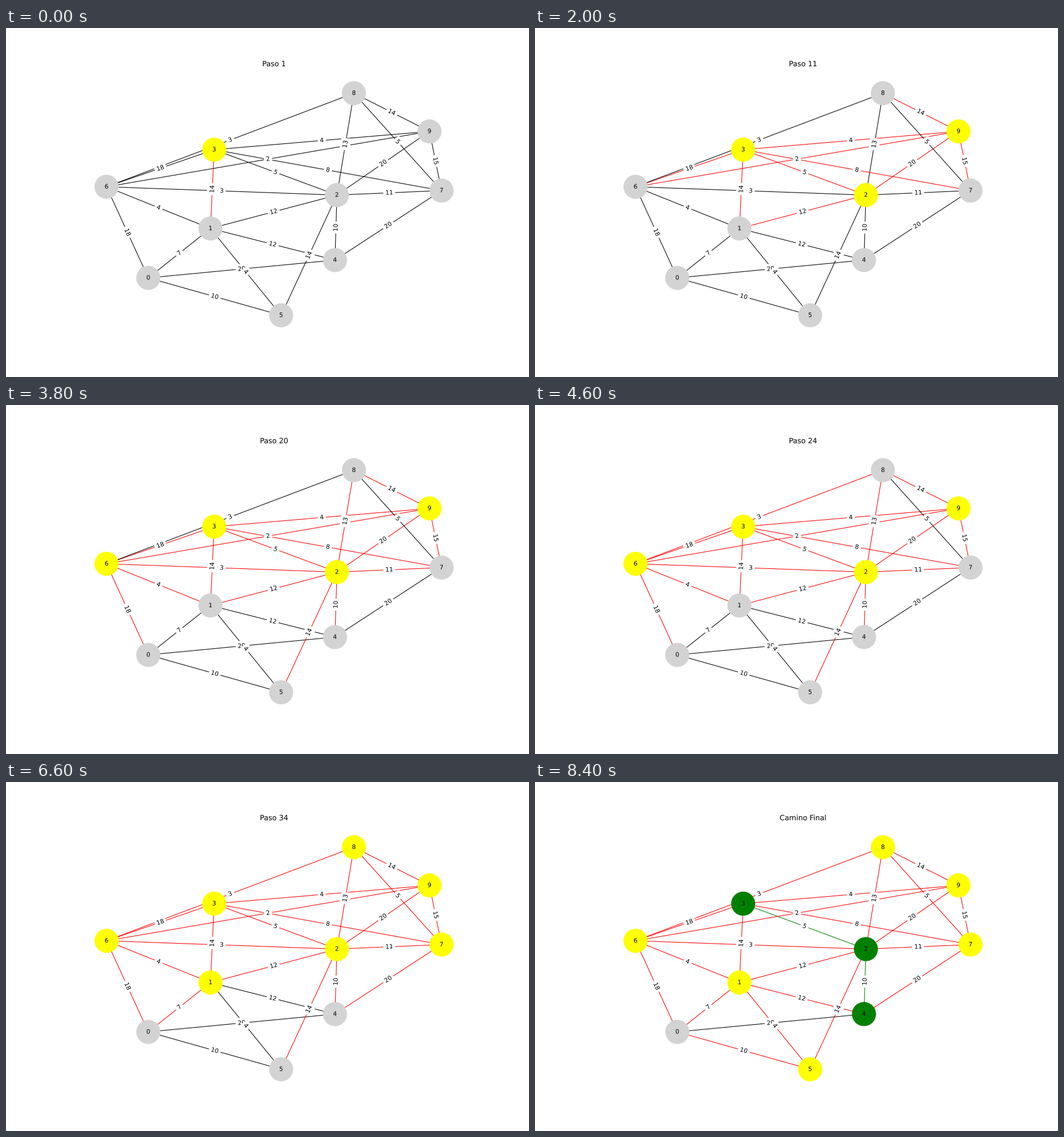
A matplotlib script that plays this animation: 917 by 611 pixels, repeating every 8.6 s.

```python
import math

import matplotlib.pyplot as plt
from matplotlib.animation import FuncAnimation
from matplotlib.collections import LineCollection
from matplotlib.patheffects import Normal

W, H, DPI = 917, 611, 76.4
START, GOAL = 3, 4

# Plot box inside the stage; the graph fills it with a doubled 5 % margin.
LEFT, RIGHT, TOP, BOTTOM = 0.125 * W, 0.9 * W, 0.12 * H, 0.89 * H
CX, CY = (LEFT + RIGHT) / 2, (TOP + BOTTOM) / 2
RX, RY = (RIGHT - LEFT) / 2 / 1.1 ** 2, (BOTTOM - TOP) / 2 / 1.1 ** 2

POS = [(249.5, 437.5), (358.5, 351), (580.2, 292.5), (365, 213), (576.8, 406.3),
       (482.4, CY + RY), (CX - RX, 278), (CX + RX, 284.6), (610, CY - RY), (742.5, 181)]

# Weighted links from each node to higher-numbered ones.
LINKS = {0: {1: 7, 4: 20, 5: 10, 6: 18},
         1: {2: 12, 3: 14, 4: 12, 5: 4, 6: 4},
         2: {3: 5, 4: 10, 5: 14, 6: 3, 7: 11, 8: 13, 9: 20},
         3: {6: 18, 7: 8, 9: 4},
         4: {7: 20},
         6: {8: 3, 9: 2},
         7: {8: 5, 9: 15},
         8: {9: 14}}
EDGES = {(a, b): w for a, row in LINKS.items() for b, w in row.items()}


def edge(a, b):
    return min(a, b), max(a, b)


def neighbours(n):
    return sorted(a + b - n for a, b in EDGES if n in (a, b))


def dijkstra(start, goal):
    """Return the (node, edge) examined at each step and the shortest path."""
    dist, prev, done, steps = {start: 0}, {}, set(), []
    while True:
        node = min((n for n in dist if n not in done), key=dist.get)
        if node == goal:
            break
        done.add(node)
        for other in neighbours(node):
            e = edge(node, other)
            steps.append((node, e))
            cost = dist[node] + EDGES[e]
            if cost < dist.get(other, math.inf):
                dist[other], prev[other] = cost, node
    path = [goal]
    while path[-1] != start:
        path.append(prev[path[-1]])
    return steps, path


def upright_angle(p, q):
    angle = math.degrees(math.atan2(p[1] - q[1], q[0] - p[0]))
    return (angle + 90) % 180 - 90


STEPS, PATH = dijkstra(START, GOAL)
PATH_EDGES = {edge(a, b) for a, b in zip(PATH, PATH[1:])}

plt.rcParams["font.family"] = "DejaVu Sans"
plt.rcParams["text.hinting"] = "none"
fig = plt.figure(figsize=((W + 1e-6) / DPI, (H + 1e-6) / DPI), dpi=DPI, facecolor="white")
ax = fig.add_axes([0, 0, 1, 1])
ax.set_xlim(0, W)
ax.set_ylim(H, 0)
ax.axis("off")


def label(x, y, text, size=10, va="center", **kw):
    # The path effect draws glyphs as smooth outlines, also when rotated.
    return ax.text(x, y, text, size=size, ha="center", va=va,
                   path_effects=[Normal()], **kw)


lines = ax.add_collection(
    LineCollection([(POS[a], POS[b]) for a, b in EDGES], linewidths=1, zorder=1),
    autolim=False)
for (a, b), weight in EDGES.items():
    p, q = POS[a], POS[b]
    label((p[0] + q[0]) / 2, (p[1] + q[1]) / 2, str(weight),
          rotation=upright_angle(p, q), zorder=1,
          bbox=dict(boxstyle="round", ec="white", fc="white"))

nodes = ax.scatter(*zip(*POS), s=1500, c="lightgray", zorder=2)
for n, (x, y) in enumerate(POS):
    label(x, y, str(n), zorder=3)

title = label(CX, TOP - 6 * DPI / 72, "", size=12, va="baseline")


def draw(i):
    final = i == len(STEPS)
    seen = STEPS[:i + 1]
    visited = {n for n, _ in seen}
    tried = {e for _, e in seen}

    def node_color(n):
        if final and n in PATH:
            return "green"
        return "yellow" if n in visited else "lightgray"

    def edge_color(e):
        if final and e in PATH_EDGES:
            return "green"
        return "red" if e in tried else "black"

    nodes.set_color([node_color(n) for n in range(len(POS))])
    lines.set_color([edge_color(e) for e in EDGES])
    title.set_text("Camino Final" if final else f"Paso {i + 1}")
    return nodes, lines, title


anim = FuncAnimation(fig, draw, frames=len(STEPS) + 1, interval=200,
                     repeat=True, repeat_delay=0, blit=False)
plt.show()
```
